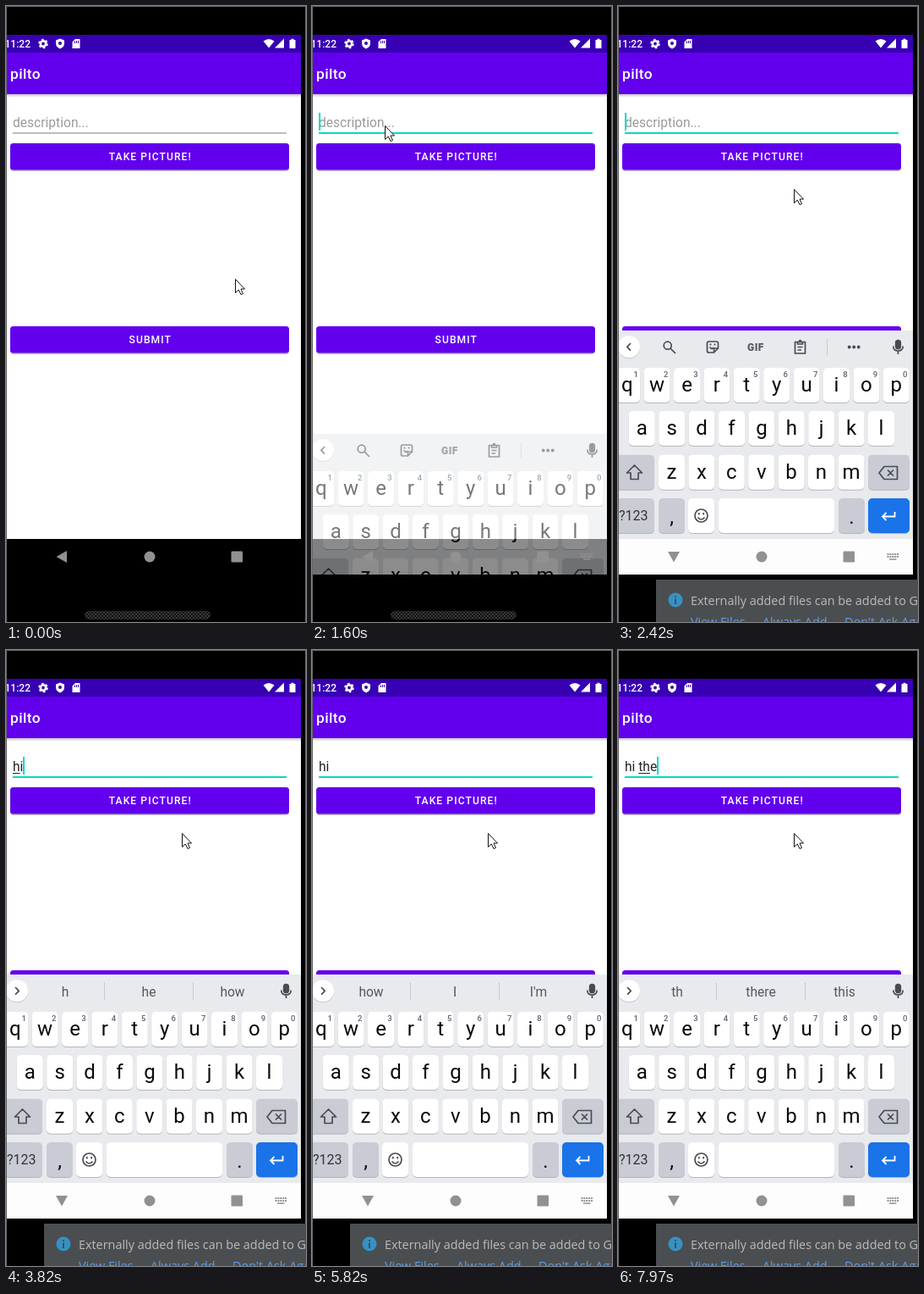
Write an HTML page that moves like this. It is 355x727 px and loops after 8000 ms.

```html
<!DOCTYPE html>
<html lang="en">
<head>
<meta charset="utf-8">
<title>Typing a description</title>
<style>
  html, body { margin: 0; width: 100%; height: 100%; overflow: hidden; background: #000; }
  svg { display: block; }
  text { font-family: Roboto, sans-serif; white-space: pre; }
  .mid { text-anchor: middle; }
  .medium { font-weight: 500; fill: #fff; }
  .button { font-size: 12.1px; letter-spacing: 1.08px; }
  .field { font-size: 15.6px; }
  .letter { font-size: 24px; fill: #0a0a0a; }
  .digit { font-size: 9.5px; font-weight: 500; fill: #5f6368; }
  .word { font-size: 15.6px; fill: #55585d; }
  .notice { font: 14.4px "Open Sans", sans-serif; fill: #bbb; }
  .link { fill: #589df6; }
  .line { fill: none; stroke: #484b50; stroke-width: 1.7; stroke-linejoin: round; }
</style>
</head>
<body>
<svg width="355" height="727" viewBox="0 0 355 727">
  <defs>
    <clipPath id="screen"><rect x="1" y="34" width="348" height="637"/></clipPath>
    <linearGradient id="shade" x2="0" y2="1">
      <stop stop-color="#000" stop-opacity=".24"/><stop offset="1" stop-color="#000" stop-opacity="0"/>
    </linearGradient>
    <pattern id="mesh" width="4" height="4" patternUnits="userSpaceOnUse">
      <rect width="4" height="4" fill="#111"/>
      <path d="M0 0L4 4M4 0L0 4" stroke="#444" stroke-width=".8"/>
    </pattern>
  </defs>

  <rect width="355" height="727"/>
  <path d="M.5 727V.5H354.5V727" fill="none" stroke="#666"/>
  <rect x="93" y="714" width="149" height="10" rx="5" fill="url(#mesh)"/>

  <g clip-path="url(#screen)">
    <path d="M0 104H349V629H0Z" fill="#fff"/>
    <rect y="104" width="349" height="4" fill="url(#shade)"/>
    <path d="M0 55H349V104H0Z" fill="#6200ee"/>
    <path d="M0 34H349V55H0Z" fill="#3700b3"/>
    <text class="medium" x="-1.5" y="49" font-size="12">11:22</text>
    <g fill="#fff">
      <circle cx="44" cy="44.500" r="3.200" fill="none" stroke="#fff" stroke-width="2.600"/>
      <circle cx="44" cy="44.500" r="4.900" fill="none" stroke="#fff" stroke-width="1.800" stroke-dasharray="2.570"/>
      <path d="M64 38.500L69 40.500V44Q69 48.500 64 50.500Q59 48.500 59 44V40.500Z"/>
      <circle cx="64" cy="44" r="2" fill="#3700b3"/>
      <path d="M82 39H87.500V50H78.500V42.500Z"/>
      <path d="M304.500 41.500Q311 36.500 317.500 41.500L311 49.500Z"/>
      <path d="M329 38.500V49.500H318Z"/>
      <path d="M335.500 40H337.500V38.700H340.500V40H342.500V50H335.500Z"/>
    </g>
    <path d="M81.500 41.500V44M83.500 41V44M85.500 41V44" stroke="#3700b3"/>
    <text class="medium" x="5" y="86" font-size="17.300" letter-spacing=".4">pilto</text>

    <text class="field" id="hint" x="8" y="143" fill="#9a9a9a">description...</text>
    <text class="field" id="typed" x="8" y="143" fill="#222"></text>
    <rect id="composing" y="145" height="1" fill="#222"/>
    <rect id="fieldLine" x="8" width="324"/>
    <rect id="caret" y="126" width="2" height="21" fill="#03dac5"/>
    <g id="buttons"></g>

    <g id="keyboard">
      <path d="M0 383H349V629H0Z" fill="#e8eaed"/>
      <path d="M0 629H349V671H0Z" fill="#fdfdfd"/>
      <g id="keys"></g>
      <path class="line" d="M19.500 542L28.500 551H24V558.500H15V551H10.500Z"/>
      <path class="line" d="M309 551L315 543.500H330.500V558.500H315ZM319 547.500L326 554.500M326 547.500L319 554.500"/>
      <g class="line">
        <circle cx="98.500" cy="601.500" r="7.500"/>
        <path d="M94.500 603.500Q98.500 608.500 102.500 603.500M95.800 598V600.500M101.200 598V600.500"/>
      </g>
      <path d="M327.500 597V602.500H313.500M317.500 598L313 602.500L317.500 607" fill="none" stroke="#fff" stroke-width="1.800"/>

      <circle cx="13" cy="403" r="13" fill="#bbb"/>
      <circle cx="13" cy="402.300" r="13" fill="#fff"/>
      <path class="line" id="chevron" d="M15 398L10.800 402.300L15 406.600"/>
      <g class="line">
        <rect x="328.700" y="394.500" width="5.600" height="10" rx="2.800" fill="#484b50"/>
        <path d="M325.800 401.500Q325.800 407 331.500 407T337.200 401.500M331.500 407V411"/>
      </g>
      <g id="tools">
        <g class="line">
          <circle cx="58.700" cy="400.700" r="4.500"/><path d="M62 404L68 410"/>
          <path d="M107.500 396H116.500Q118.500 396 118.500 398V404L113.500 409H107.500Q105.500 409 105.500 407V398Q105.500 396 107.500 396ZM113.500 409V404H118.500M108.500 402.500Q111 406 113 403"/>
          <path d="M109.500 398.500V400.500M114.500 398.500V400.500"/>
          <path d="M209.500 396.500H221.500V410H209.500ZM212.500 396V399H218.500V396M212.500 402.500H218.500M212.500 406H217"/>
          <circle cx="215.500" cy="395.500" r="1"/>
        </g>
        <text class="mid" x="163" y="406.500" font-size="12" font-weight="900" fill="#55585d" letter-spacing=".5">GIF</text>
        <path d="M247.500 393V412" stroke="#c8cacf"/>
        <g fill="#484b50"><circle cx="273.700" cy="402.500" r="1.900"/><circle cx="279.200" cy="402.500" r="1.900"/><circle cx="284.700" cy="402.500" r="1.900"/></g>
      </g>
      <g id="suggestions">
        <path d="M116.500 392V413M221.500 392V413" stroke="#c8cacf"/>
        <text class="word mid" x="70" y="408.500"></text>
        <text class="word mid" x="169" y="408.500"></text>
        <text class="word mid" x="268" y="408.500"></text>
      </g>
    </g>

    <g fill="#919191">
      <path id="back" d="M59.500 650L72 643V657Z"/>
      <circle cx="170" cy="650" r="6.500"/>
      <rect x="266.500" y="643.500" width="13.500" height="13" rx="1"/>
      <g id="switcher">
        <path d="M318.500 647H332M318.500 650H332" stroke="#919191" stroke-width="2" stroke-dasharray="2 .9"/>
        <path d="M321 653H329.500" stroke="#919191" stroke-width="1.500"/>
      </g>
    </g>
  </g>

  <g id="notice">
    <path d="M45 677H355V727H45Z" fill="#4b4e50"/>
    <circle cx="68" cy="701" r="8.500" fill="#3592c4"/>
    <path d="M68 696V698M68 699.500V706" stroke="#4b4e50" stroke-width="2"/>
    <text class="notice" x="86" y="707">Externally added files can be added to Git</text>
    <text class="notice link" x="86" y="731.500">View Files</text>
    <text class="notice link" x="171" y="731.500">Always Add</text>
    <text class="notice link" x="268" y="731.500">Don't Ask Again</text>
  </g>
  <path id="pointer" d="M.5 .5V16.500L4.300 13L7 18.500L9.500 17.500L7 12H11.500Z" fill="#fff" stroke="#111"/>
</svg>
<script>
const el = id => document.getElementById(id);
const show = (id, visible) => el(id).setAttribute('display', visible ? 'inline' : 'none');
const set = (id, attrs) => {
  for (const name in attrs) el(id).setAttribute(name, attrs[name]);
};

const button = (y, label) => `
  <rect x="5" y="${y + 1}" width="330" height="32" rx="4" fill="#000" opacity=".25"/>
  <rect x="5" y="${y}" width="330" height="31.500" rx="3.500" fill="#6200ee"/>
  <text class="medium button mid" x="170.800" y="${y + 20.2}">${label}</text>`;
el('buttons').innerHTML = button(162, 'TAKE PICTURE!') + button(378, 'SUBMIT');

const key = (x, y, width, fill = '#fff') => `
  <rect x="${x}" y="${y + 1}" width="${width}" height="41" rx="5" fill="#b4b6ba"/>
  <rect x="${x}" y="${y}" width="${width}" height="41" rx="5" fill="${fill}"/>`;
const label = (x, y, text, cls = 'letter') => `<text class="${cls} mid" x="${x}" y="${y}">${text}</text>`;
const keyRow = (letters, firstX, y, numbered) => [...letters].map((letter, i) => {
  const x = firstX + i * 35.4;
  return key(x - 15.5, y, 31) + label(x, y + 28, letter) +
    (numbered ? label(x + 10.5, y + 10.5, (i + 1) % 10, 'digit') : '');
}).join('');
const GREY = '#c9ccd4';
el('keys').innerHTML =
  keyRow('qwertyuiop', 10.7, 427, true) + keyRow('asdfghjkl', 28.3, 478) + keyRow('zxcvbnm', 63.5, 529.7) +
  key(-6, 529.7, 49, GREY) + key(296, 529.7, 49, GREY) +
  key(-6, 581, 49, GREY) + key(48, 581, 31, GREY) + key(83, 581, 31) +
  key(119, 581, 137) + key(261, 581, 31, GREY) + key(296, 581, 49, '#1a73e8') +
  '<text x="1" y="607" font-size="16" fill="#333">?123</text>' +
  label(63.5, 611, ',') + label(276.5, 611, '.');

const ruler = document.createElement('canvas').getContext('2d');
ruler.font = '15.6px Roboto, sans-serif';
const measure = text => ruler.measureText(text).width;

// Each step lists only what changes; "composing" is the underlined [start, end) of the text.
const HI = ['hi', 'Hi', 'his'], NEXT = ['how', 'I', "I'm"];
const steps = [
  [0, { pointer: [271, 322], focus: false, caret: false, keyboard: 0, turn: 0, notice: false, text: '', composing: [0, 0], words: null }],
  [440, { pointer: [258, 302] }],
  [590, { pointer: [225, 256] }],
  [740, { pointer: [184, 200] }],
  [890, { pointer: [148, 152] }],
  [1050, { pointer: [128, 131] }],
  [1460, { pointer: [86, 141], focus: true, caret: true }],
  [1600, { keyboard: 0.55 }],
  [1730, { keyboard: 1, caret: false }],
  [1880, { turn: -45 }],
  [2000, { turn: -90 }],
  [2270, { pointer: [160, 186], caret: true }],
  [2420, { pointer: [208, 216], notice: true }],
  [2700, { caret: false }],
  [3260, { caret: true }],
  [3540, { text: 'h' }],
  [3820, { text: 'hi', composing: [0, 1], words: ['h', 'he', 'how'] }],
  [3960, { composing: [0, 2] }],
  [4100, { words: HI }],
  [4560, { caret: false }],
  [4970, { caret: true }],
  [5110, { text: 'hi ', composing: [0, 0] }],
  [5260, { words: NEXT }],
  [5820, { caret: false }],
  [6100, { text: 'hi', composing: [0, 2], words: HI, caret: true }],
  [6380, { text: 'hi,', composing: [0, 0] }],
  [6520, { words: NEXT }],
  [6660, { text: 'hi, ' }],
  [7080, { text: 'hi,' }],
  [7240, { text: 'hi', composing: [0, 2], words: HI }],
  [7670, { text: 'hi ', composing: [0, 0], words: NEXT }],
  [7820, { text: 'hi t', composing: [3, 4] }],
  [7970, { text: 'hi the', composing: [3, 5], words: ['th', 'there', 'this'] }],
];

function render(time) {
  const s = Object.assign({}, ...steps.filter(([start]) => start <= time).map(([, change]) => change));
  const [from, to] = s.composing;
  const xAt = index => 8 + measure(s.text.slice(0, index));

  set('pointer', { transform: `translate(${s.pointer})` });
  show('notice', s.notice);
  show('hint', !s.text);
  el('typed').textContent = s.text;
  set('composing', { x: xAt(from), width: xAt(to) - xAt(from) });
  set('fieldLine', s.focus ? { y: 149, height: 2, fill: '#03dac5' } : { y: 149.5, height: 1, fill: '#7d7d7d' });
  show('caret', s.caret);
  set('caret', { x: Math.round(xAt(s.text.length)) });

  const sliding = s.keyboard < 1;
  set('keyboard', { opacity: s.keyboard, transform: `translate(0 ${sliding ? 122 : 0})` });
  show('switcher', s.keyboard > 0);
  set('back', { transform: `rotate(${s.turn} 66 650)` });
  show('tools', !s.words);
  show('suggestions', s.words);
  set('chevron', { transform: s.words ? 'rotate(180 13 402.3)' : '' });
  el('suggestions').querySelectorAll('text').forEach((node, i) => {
    node.textContent = s.words ? s.words[i] : '';
  });
}

const begin = performance.now();
function tick() {
  render((performance.now() - begin) % 8000);
  requestAnimationFrame(tick);
}
tick();
</script>
</body>
</html>
```
